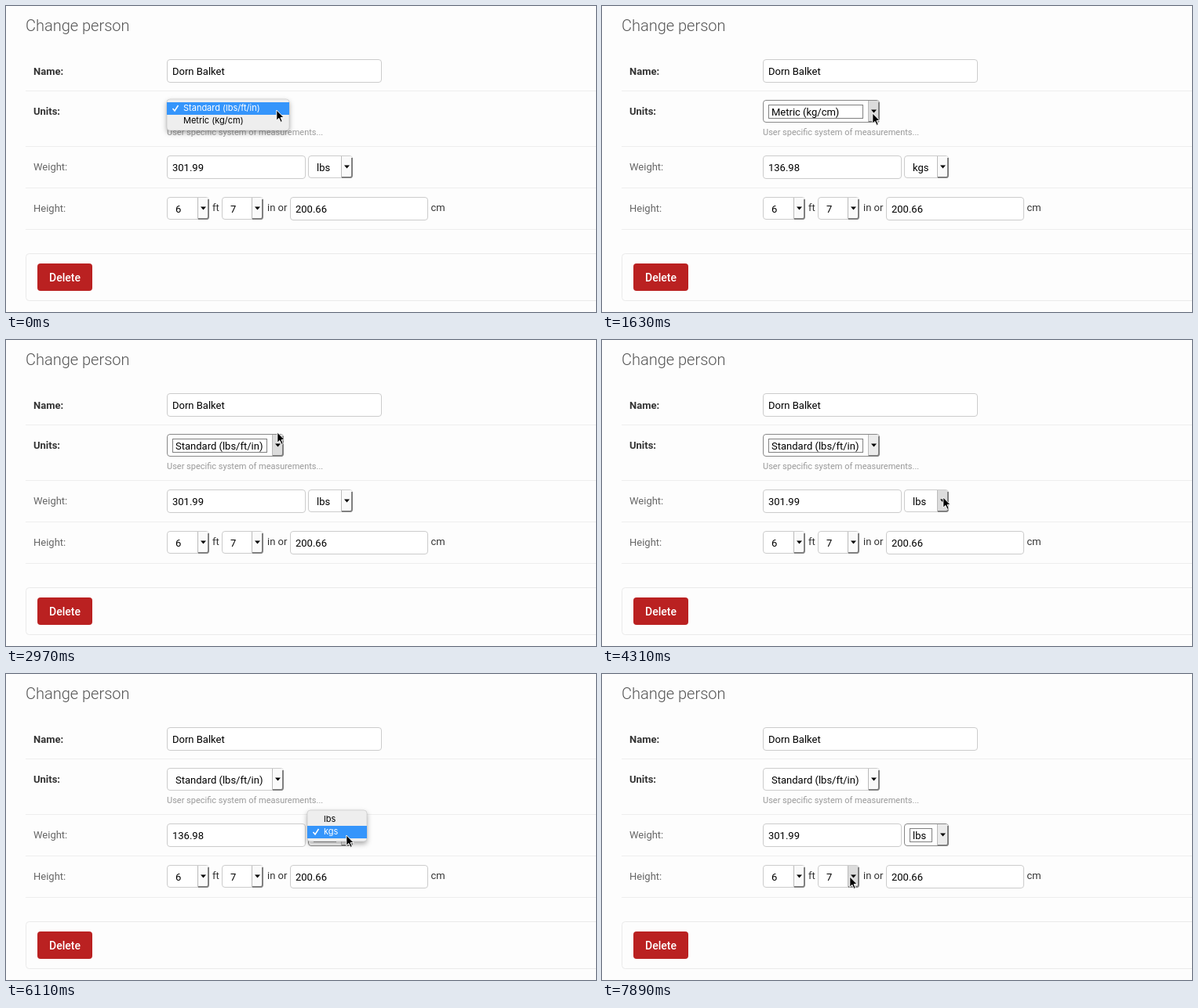
An HTML page that plays this animation: 752 px wide and 391 px high, repeating every 8000 ms.

```html
<!DOCTYPE html>
<html lang="en">
<head>
<meta charset="utf-8">
<title>Change person</title>
<style>
html, body { margin: 0; width: 100%; height: 100%; overflow: hidden; background: #fdfdfd; }
svg { display: block; width: 752px; height: 391px; }
text { font: 13px Roboto, sans-serif; fill: #000; white-space: pre; }
.title { font-size: 20px; font-weight: 300; fill: #555; }
.bold { font-weight: 700; fill: #333; }
.label { fill: #666; }
.unit { fill: #333; }
.help { font-size: 11px; fill: #999; }
.delete { font-size: 14px; font-weight: 500; fill: #fff; }
.item { font: 11px Inter, sans-serif; }
.popup { filter: drop-shadow(0 3px 3px rgba(0, 0, 0, .32)); }
</style>
</head>
<body>
<svg id="stage" viewBox="0 0 752 391"></svg>
<script>
const LOOP = 8000;
const stage = document.getElementById('stage');

function el(tag, attrs, parent = stage) {
  const node = document.createElementNS('http://www.w3.org/2000/svg', tag);
  for (const key in attrs) node.setAttribute(key, attrs[key]);
  return parent.appendChild(node);
}

function text(x, y, str, cls = '', parent = stage) {
  const node = el('text', { x, y, class: cls }, parent);
  node.textContent = str;
  return node;
}

function show(node, on) {
  node.setAttribute('visibility', on ? 'inherit' : 'hidden');
}

function input(x, y, w, value) {
  el('rect', { x: x + .5, y: y + .5, width: w - 1, height: 29, rx: 3.5, fill: '#fff', stroke: '#ccc' });
  return text(x + 7, y + 20, value);
}

function select(x, y, w, value) {
  const right = x + w, left = right - 15;
  const frame = el('rect', { x: x + .5, y: y + .5, width: w - 1, height: 28, rx: 3.5, fill: '#fff', stroke: '#ccc' });
  const button = el('path', { d: `M${left} ${y + 1}H${right - 3}Q${right - 1} ${y + 1} ${right - 1} ${y + 4}V${y + 28}H${left}Z` });
  el('path', { d: `M${left + .5} ${y + 1}V${y + 28}`, stroke: '#bbb' });
  el('path', { d: `M${left + 1} ${y + 28}H${right - 3}Q${right - 1} ${y + 28} ${right - 1} ${y + 25}V${y + 3}`,
    fill: 'none', stroke: '#808080', 'stroke-width': 2 });
  el('path', { d: `M${right - 11} ${y + 12.5}h7l-3.5 4z` });
  const ring = el('rect', { x: x + 7.5, y: y + 6.5, width: w - 29, height: 17,
    fill: 'none', stroke: '#000', 'stroke-dasharray': '1 1' });
  const label = text(x + 11, y + 20, value);

  return function (str, focused, cursor) {
    const over = cursor && cursor.x >= left && cursor.x <= right && cursor.y >= y - 3 && cursor.y <= y + 29;
    label.textContent = str;
    frame.setAttribute('stroke', focused ? '#888' : '#ccc');
    button.setAttribute('fill', over ? '#dcdcdc' : focused ? '#ebebeb' : '#fafafa');
    show(ring, focused);
  };
}

// The checked row of an open menu always sits over the closed control.
function menu(x, y, w, names) {
  const group = el('g', {});
  el('rect', { x, y: 0, width: w, height: 40, rx: 4, fill: '#eee', stroke: '#bbb', 'stroke-width': .5, class: 'popup' }, group);
  const bar = el('rect', { x, width: w, height: 16, fill: '#3595fb' }, group);
  const tick = el('path', { fill: 'none', 'stroke-width': 1.5, d: `M${x + 7.5} 12l2.5 3 4.5-7` }, group);
  const items = names.map((name, i) => text(x + 21, 15 + 16 * i, name, 'item', group));

  return function (state) {
    show(group, !!state);
    if (!state) return;
    const { checked, lit } = state;
    group.setAttribute('transform', `translate(0 ${y - 16 * checked})`);
    show(bar, lit >= 0);
    bar.setAttribute('y', 4 + 16 * Math.max(lit, 0));
    tick.setAttribute('transform', `translate(0 ${16 * checked})`);
    tick.setAttribute('stroke', lit === checked ? '#fff' : '#000');
    items.forEach((item, i) => { item.style.fill = i === lit ? '#fff' : '#000'; });
  };
}

// Fixed page
el('rect', { width: 752, height: 391, fill: '#fdfdfd' });
text(25, 32, 'Change person', 'title');
text(35, 88, 'Name:', 'bold');
text(35, 139, 'Units:', 'bold');
text(35, 210, 'Weight:', 'label');
text(35, 263, 'Height:', 'label');
text(205, 165, 'User specific system of measurements...', 'help');
for (const y of [108, 179, 232, 285])
  el('rect', { x: 25, y, width: 727, height: 1, fill: '#eee' });
text(263, 262, 'ft', 'unit');
text(333, 262, 'in or', 'unit');
text(541.5, 262, 'cm', 'unit');
el('rect', { x: 25.5, y: 316.5, width: 740, height: 60, rx: 4, fill: '#fdfdfd', stroke: '#eaeaea' });
el('rect', { x: 40, y: 329, width: 70, height: 35, rx: 4, fill: '#ba2121' });
text(55, 352, 'Delete', 'delete');

// Controls
const UNITS = ['Standard (lbs/ft/in)', 'Metric (kg/cm)'];
const SCALES = ['lbs', 'kgs'];
const WEIGHTS = ['301.99', '136.98'];
input(205, 68, 274, 'Dorn Balket');
const weight = input(205, 191, 177, WEIGHTS[0]);
input(362, 244, 176, '200.66');
const units = select(205, 120, 149, UNITS[0]);
const scale = select(385, 191, 57, SCALES[0]);
const feet = select(205, 244, 54, '6');
const inches = select(275, 244, 53, '7');
const unitsMenu = menu(205, 119, 156, UNITS);
const scaleMenu = menu(384, 190, 76, SCALES);
const pointer = el('path', { d: 'M.8 1V14.3L3.9 11.4 6.1 16.4 8.3 15.4 6.1 10.6H10.2Z',
  stroke: '#fff', 'stroke-width': 1, 'stroke-linejoin': 'round' });

// Script: time, open menu, checked row, lit row
const menus = [
  [0, 'units', 0, 0], [300, 'units', 0, 1], [900, 'units', 0, -1], [1050],
  [1780, 'units', 1, 1], [2070, 'units', 1, 0], [2970],
  [4460, 'scale', 0, 0], [4760, 'scale', 0, 1], [5210, 'scale', 0, -1], [5360],
  [6110, 'scale', 1, 1], [6400, 'scale', 1, 0], [7150]
];

// Pointer stops: time, x, y
const stops = [
  [0, 344, 132], [300, 344, 140], [450, 344, 143], [1190, 344, 141],
  [1490, 344, 138], [1630, 344, 136], [1930, 344, 129], [2070, 345, 121], [2220, 345, 117],
  ...glide(3420, 4310, 7, [345, 117], [434, 200], 1),
  [4760, 434, 210], [4910, 434, 211],
  [5660, 434, 208], [5810, 433, 205], [6260, 433, 197], [6400, 433, 187],
  ...glide(7150, 7890, 6, [433, 187], [315, 258], 0)
];

// Eased travel sampled at n evenly spaced times
function glide(t0, t1, n, from, to, lead) {
  return Array.from({ length: n }, (_, i) => {
    const p = (i + lead) / (n - 1 + lead), e = p * p * (3 - 2 * p);
    const time = t0 + Math.round((t1 - t0) * i / (n - 1) / 10) * 10;
    return [time, ...from.map((a, k) => a + (to[k] - a) * e)];
  });
}

function at(list, t) {
  let found = list[0];
  for (const step of list) if (step[0] <= t) found = step;
  return found;
}

function within(t, a, b) {
  return t >= a && t < b;
}

function draw(t) {
  const [, x, y] = at(stops, t);
  const [, open, checked, lit] = at(menus, t);
  const metric = within(t, 1050, 2970) ? 1 : 0;
  const kilos = metric || within(t, 5360, 7150) ? 1 : 0;
  const cursor = open ? null : { x, y };
  const state = { checked, lit };

  weight.textContent = WEIGHTS[kilos];
  units(UNITS[metric], t < 4460, cursor);
  scale(SCALES[kilos], t >= 4460, cursor);
  feet('6', false, cursor);
  inches('7', false, cursor);
  unitsMenu(open === 'units' && state);
  scaleMenu(open === 'scale' && state);
  pointer.setAttribute('transform', `translate(${x} ${y})`);
}

const start = performance.now();
function tick(now) {
  draw(Math.max(0, now - start) % LOOP);
  requestAnimationFrame(tick);
}
draw(0);
requestAnimationFrame(tick);
</script>
</body>
</html>
```
